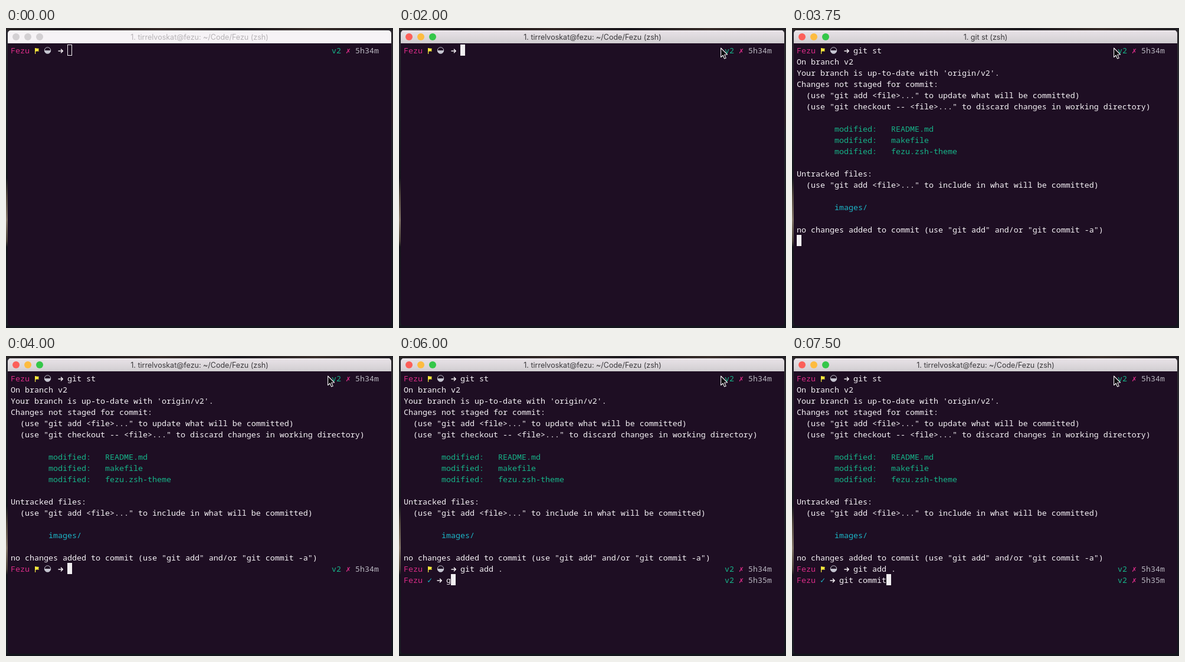
These frames come from a looping animation (656 px wide and 509 px high, 8000 ms). An HTML page with a canvas:

```html
<!DOCTYPE html>
<html lang="en">
<head>
<meta charset="utf-8">
<title>Terminal</title>
<style>
  html, body { margin: 0; width: 100%; height: 100%; overflow: hidden; background: #17171e; }
  canvas { display: block; }
</style>
</head>
<body>
<canvas id="stage" width="656" height="509"></canvas>
<script>
const ctx = document.getElementById('stage').getContext('2d');
const LOOP = 8000, COL = 8, ROW = 19, LEFT = 8, TOP = 28;
const MONO = '500 13.333px "Noto Sans Mono", "DejaVu Sans Mono", monospace';
const MARK = '13.5px "DejaVu Sans Mono", "DejaVu Sans", monospace';
const TITLE = '12.5px Inter, "Liberation Sans", sans-serif';

const INK = '#f7f3f7', PINK = '#d92c87', GREEN = '#16b489', CYAN = '#1cb5c6',
      YELLOW = '#f8e93c', GRAY = '#b9b6c0';
const HOME = '1. tirrelvoskat@fezu: ~/Code/Fezu ';

// [row, column, text, colour]
const OUTPUT = [
  [1, 0, 'On branch v2'],
  [2, 0, "Your branch is up-to-date with 'origin/v2'."],
  [3, 0, 'Changes not staged for commit:'],
  [4, 2, '(use "git add <file>..." to update what will be committed)'],
  [5, 2, '(use "git checkout -- <file>..." to discard changes in working directory)'],
  [7, 8, 'modified:   README.md', GREEN],
  [8, 8, 'modified:   makefile', GREEN],
  [9, 8, 'modified:   fezu.zsh-theme', GREEN],
  [11, 0, 'Untracked files:'],
  [12, 2, '(use "git add <file>..." to include in what will be committed)'],
  [14, 8, 'images/', CYAN],
  [16, 0, 'no changes added to commit (use "git add" and/or "git commit -a")']
];

// keys: [time, characters typed so far]
const PROMPTS = [
  { row: 0, from: 0, to: 3750, clock: '5h34m', dirty: true, cmd: 'git st',
    keys: [[2500, 1], [2750, 3], [3250, 5], [3500, 6]] },
  { row: 17, from: 4000, to: 5750, clock: '5h34m', dirty: true, cmd: 'git add .',
    keys: [[4500, 2], [4750, 4], [5000, 6], [5250, 8], [5500, 9]] },
  { row: 18, from: 5750, to: LOOP, clock: '5h35m', dirty: false, cmd: 'git commit',
    keys: [[6000, 1], [6250, 3], [6500, 5], [6750, 7], [7000, 8], [7250, 9], [7500, 10]] }
];

const colX = c => LEFT + c * COL;
const rowY = r => TOP + r * ROW;

function fade(x0, y0, x1, y1, stops) {
  const g = ctx.createLinearGradient(x0, y0, x1, y1);
  for (const [at, color] of stops) g.addColorStop(at, color);
  return g;
}

function box(x, y, w, h, fill) {
  ctx.fillStyle = fill;
  ctx.fillRect(x, y, w, h);
}

function disc(x, y, r, fill) {
  ctx.fillStyle = fill;
  ctx.beginPath();
  ctx.arc(x, y, r, 0, Math.PI * 2);
  ctx.fill();
}

function poly(points, fill) {
  ctx.beginPath();
  points.forEach(([x, y]) => ctx.lineTo(x, y));
  ctx.closePath();
  ctx.fillStyle = fill;
  ctx.fill();
}

function type(row, col, text, color = INK, font = MONO) {
  ctx.font = font;
  ctx.textAlign = 'left';
  ctx.fillStyle = color;
  ctx.fillText(text, colX(col), rowY(row) + 15);
}

function backdrop() {
  box(0, 0, 656, 509, '#15151d');
  box(0, 0, 656, 5, fade(0, 0, 656, 0, [[0, '#2a2626'], [0.15, '#1b171b'],
    [0.4, '#352b29'], [0.6, '#1c1a1f'], [0.8, '#3a302d'], [1, '#211f24']]));
  box(0, 4, 4, 501, fade(0, 0, 0, 509, [[0, '#2a2a30'], [0.2, '#1e2027'], [0.5, '#15171d'],
    [0.56, '#544a40'], [0.64, '#85786a'], [0.71, '#4b433a'], [0.73, '#15161c'], [1, '#1b1d25']]));
  box(652, 4, 4, 501, fade(0, 0, 0, 509, [[0, '#2c2a2d'], [0.2, '#25262d'], [0.31, '#2b2127'],
    [0.35, '#24252c'], [0.7, '#191a22'], [1, '#14151d']]));
}

function chrome(focus, title) {
  ctx.save();
  ctx.beginPath();
  ctx.roundRect(3, 4, 650, 501, 5);
  ctx.clip();
  box(3, 4, 650, 501, '#1e0e23');
  box(3, 4, 650, 22, focus ? fade(0, 4, 0, 26, [[0, '#e9e3e8'], [1, '#d1ced1']]) : '#f6f3f6');
  if (focus) box(3, 4, 650, 1, '#f3eef2');
  ctx.restore();

  const lights = focus ? ['#fc5f59', '#fdbc40', '#34c749'] : ['#d3d0d3', '#d3d0d3', '#d3d0d3'];
  lights.forEach((color, i) => disc(17 + i * 20, 15, 6, color));

  ctx.font = TITLE;
  ctx.textAlign = 'center';
  ctx.fillStyle = focus ? '#3b393c' : '#b5b2b5';
  ctx.fillText(title, 328, 20);
}

function flag(x, y) {
  box(x + 1, y + 6, 1.2, 10, YELLOW);
  poly([[x + 1, y + 6], [x + 4, y + 6.5], [x + 8, y + 7], [x + 7, y + 9.3],
    [x + 8, y + 11.5], [x + 4.5, y + 11.5], [x + 1, y + 12]], YELLOW);
}

function halfMoon(x, y) {
  ctx.strokeStyle = '#c5c5d0';
  ctx.lineWidth = 1;
  ctx.beginPath();
  ctx.arc(x + 6.5, y + 10, 5.2, 0, Math.PI * 2);
  ctx.stroke();
  ctx.fillStyle = '#c5c5d0';
  ctx.beginPath();
  ctx.arc(x + 6.5, y + 10, 5.5, 0, Math.PI);
  ctx.fill();
}

function arrow(x, y) {
  ctx.strokeStyle = INK;
  ctx.lineWidth = 1.5;
  ctx.beginPath();
  ctx.moveTo(x + 0.5, y + 11);
  ctx.lineTo(x + 8, y + 11);
  ctx.moveTo(x + 5, y + 7.8);
  ctx.lineTo(x + 8.2, y + 11);
  ctx.lineTo(x + 5, y + 14.2);
  ctx.stroke();
}

function block(row, col, focus) {
  const x = colX(col), y = rowY(row);
  if (focus) return box(x, y, COL, ROW, '#f1eef1');
  ctx.strokeStyle = '#f1eef1';
  ctx.lineWidth = 1;
  ctx.strokeRect(x + 0.5, y + 0.5, COL - 1, ROW - 1);
}

function prompt(p, t, focus) {
  if (t < p.from) return;
  const y = rowY(p.row), start = p.dirty ? 12 : 9;
  type(p.row, 0, 'Fezu', PINK);
  if (p.dirty) {
    flag(colX(5), y);
    halfMoon(colX(7), y);
  } else {
    type(p.row, 5, '✓', CYAN, MARK);
  }
  arrow(colX(start - 2), y);

  const typed = p.keys.reduce((n, [at, count]) => t >= at ? count : n, 0);
  type(p.row, start, p.cmd.slice(0, typed));
  if (t < p.to) block(p.row, start + typed, focus);

  type(p.row, 68, 'v2', GREEN);
  type(p.row, 71, '✗', PINK, 'bold ' + MARK);
  type(p.row, 73, p.clock, GRAY);
}

function pointer(x, y) {
  const shape = [[0, 0], [0, 15.5], [3.5, 12.3], [6, 18], [8.6, 16.9], [6.2, 11.3], [11, 11]];
  poly(shape.map(([dx, dy]) => [x + dx, y + dy]), '#0b070d');
  ctx.strokeStyle = '#f4f1f4';
  ctx.lineWidth = 1.1;
  ctx.lineJoin = 'round';
  ctx.stroke();
}

function titleAt(t) {
  if (t >= 3750 && t < 4000) return '1. git st (zsh)';
  return HOME + (t >= 6250 && t < 7000 ? '(git)' : '(zsh)');
}

function draw(t) {
  const focus = t >= 2000;
  backdrop();
  chrome(focus, titleAt(t));
  if (t >= 3750) OUTPUT.forEach(line => type(...line));
  if (t >= 3750 && t < 4000) block(17, 0, true);
  PROMPTS.forEach(p => prompt(p, t, focus));
  if (t >= 1000) pointer(545.6, 34);
}

const begin = performance.now();
function tick() {
  draw((performance.now() - begin) % LOOP);
  requestAnimationFrame(tick);
}
tick();
</script>
</body>
</html>
```
